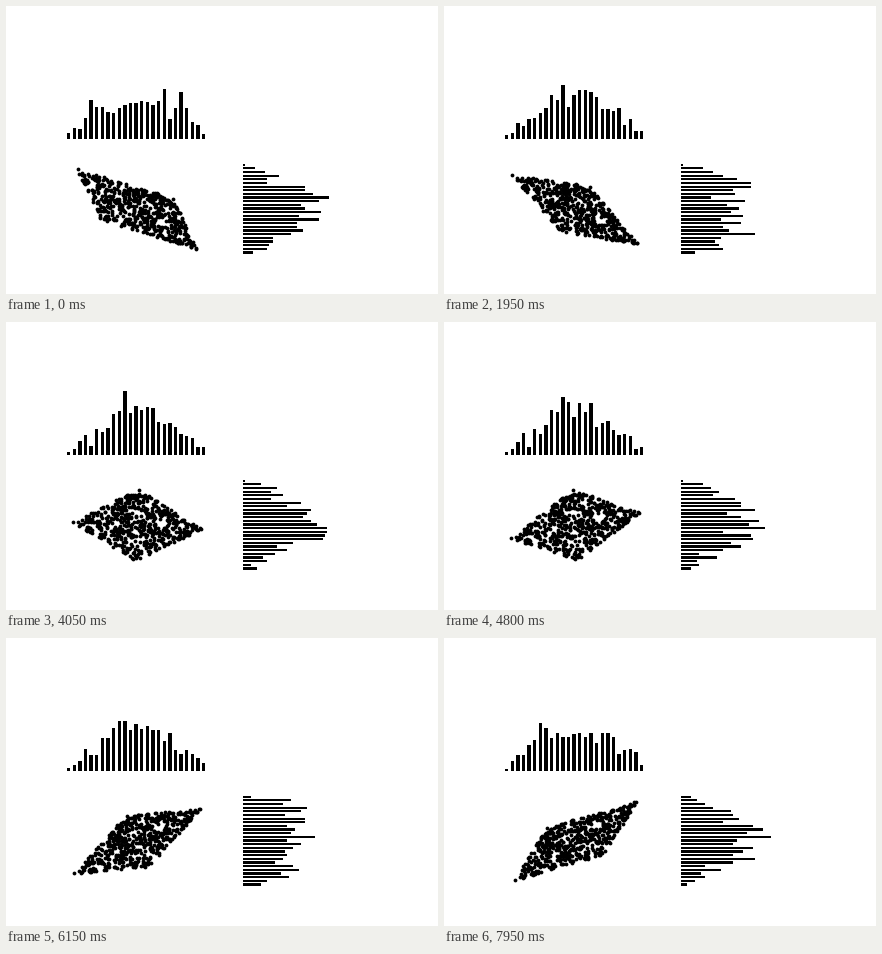
A matplotlib script for the animation above (8 s loop, 432 by 288 pixels).

```python
import numpy as np
import matplotlib.pyplot as plt
from matplotlib.animation import FuncAnimation

WIDTH, HEIGHT, DPI = 432, 288, 72
TICK, HOLD, LOOP = 50, 150, 8000  # ms
BINS = 25
CENTER = np.array([131, 203])
COUNT_TO_HEIGHT, COUNT_TO_WIDTH = 1.22, 2.0

# Uniform square, expressed along its two diagonals, with one point at the tip.
rng = np.random.default_rng(5)
square = rng.uniform(-1, 1, (570, 2))
diagonals = np.column_stack([square.sum(1), square[:, 0] - square[:, 1]]) / 2
diagonals = diagonals[diagonals[:, 0] < 0.92]
diagonals = np.vstack([diagonals, [[0.99, 0], [-0.98, 0.01]]])


def project(seconds):
    """Pixel positions of the turning square."""
    t = seconds - 4.2
    turn = np.arctan(0.6 * t + 0.015 * t**3)
    reach = 64.5 - 0.25 * t**2
    lean = -(0.08 * t + 0.0035 * t**3)
    tall = 36 + 5.5 * (1 - np.exp(-t**2))
    axes = np.array([
        [-reach, tall * np.sin(turn)],
        [reach * lean, -tall * np.cos(turn)],
    ])
    return CENTER + diagonals @ axes


fig = plt.figure(figsize=(WIDTH / DPI, HEIGHT / DPI), dpi=DPI, facecolor="white")
ax = fig.add_axes([0, 0, 1, 1])
ax.axis("off")

slots = np.arange(BINS)
columns = ax.bar(61 + slots * 5.62, np.zeros(BINS), 3.38, bottom=132.7,
                 align="edge", color="black", linewidth=0)
rows = ax.barh(157.55 + slots * 3.66, np.zeros(BINS), 2.2, left=237,
               align="edge", color="black", linewidth=0)
dots = ax.scatter([], [], s=14.5, color="black", linewidths=0)
ax.set(xlim=(0, WIDTH), ylim=(HEIGHT, 0))


def update(frame):
    points = project(frame * TICK // HOLD * HOLD / 1000)
    dots.set_offsets(points)
    for bar, count in zip(columns, np.histogram(points[:, 0], BINS)[0]):
        bar.set_height(-count * COUNT_TO_HEIGHT)
    for bar, count in zip(rows, np.histogram(points[:, 1], BINS)[0]):
        bar.set_width(count * COUNT_TO_WIDTH)
    return [dots, *columns, *rows]


anim = FuncAnimation(fig, update, frames=LOOP // TICK, interval=TICK,
                     repeat=True, repeat_delay=0, blit=False)
plt.show()
```
